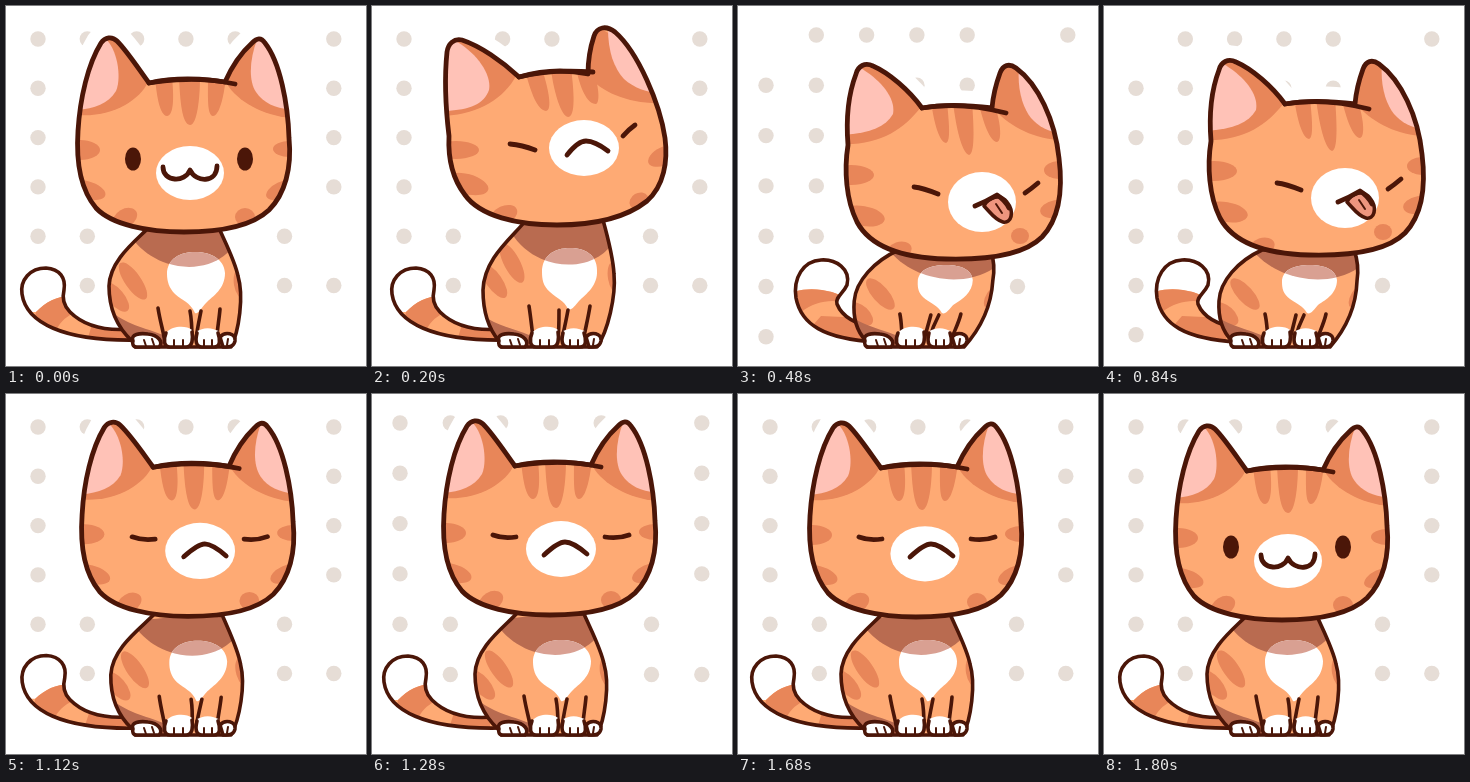
An HTML page for the animation above (1920 ms loop, 360 by 360 pixels).

```html
<!DOCTYPE html>
<html lang="en">
<head>
<meta charset="utf-8">
<title>Sneezing kitten</title>
<style>
html, body { margin: 0; width: 100%; height: 100%; overflow: hidden; background: #fff; }
svg { display: block; width: 100vw; height: 100vh; }
.line { fill: none; stroke: #4b1608; stroke-width: 4.8; stroke-linecap: round; stroke-linejoin: round; }
.thin { stroke-width: 3.6; }
.toe { stroke-width: 2; }
.halo { fill: #fff; stroke: #fff; stroke-width: 30; stroke-linejoin: round; }
.slim { stroke-width: 20; }
.fur { fill: #feaa74; }
.dark { fill: #e88659; }
.pink { fill: #ffc2b7; }
.white { fill: #fff; }
.shade { fill: #b96b50; }
.soft { fill: #d9a092; }
.dot { fill: #e6ddd6; }
.eye { fill: #4b1608; }
</style>
</head>
<body>
<svg id="stage" viewBox="0 0 360 360">
  <defs>
    <path id="head"/><path id="body"/><path id="tail"/><path id="chest"/>
    <clipPath id="inHead"><use href="#head"/></clipPath>
    <clipPath id="inBody"><use href="#body"/></clipPath>
    <clipPath id="inTail"><use href="#tail"/></clipPath>
    <clipPath id="inChest"><use href="#chest"/></clipPath>
  </defs>
  <g id="dots" class="dot"></g>
  <g data-move="tail"><use href="#tail" class="halo slim"/></g>
  <g data-move="body"><use href="#body" class="halo slim"/></g>
  <g data-move="head"><use href="#head" class="halo"/></g>

  <g data-move="tail">
    <use href="#tail" class="fur"/>
    <g clip-path="url(#inTail)">
      <path id="tip" class="white"/><path id="band" class="dark"/><path id="band2" class="dark"/>
    </g>
    <use href="#tail" class="line thin"/>
  </g>

  <g data-move="body">
    <use href="#body" class="fur"/>
    <g clip-path="url(#inBody)">
      <g id="flank" class="dark"></g>
      <path class="shade" d="M104 304C118 318 140 322 157 329L158 341L110 341Z"/>
      <path id="shadow" class="shade"/>
      <use href="#chest" class="white"/>
      <g clip-path="url(#inChest)"><path id="shadow2" class="soft"/></g>
    </g>
    <use href="#body" class="line thin"/>
    <path id="legs" class="line thin"/>
  </g>
  <g id="paws">
    <path class="white" d="M161 326C166 320 180 319 186 324L186 336L183 341L162 341L159 335Z"/>
    <path class="white" d="M191 326C196 321 207 321 213 326L213 336L210 341L193 341L190 335Z"/>
    <path class="line thin" style="fill:#fff" d="M127 335C124 328 134 327 142 328C152 329 158 336 153 341L131 341C127 341 126 338 127 335Z"/>
    <path class="line thin" style="fill:#fff" d="M214 331C219 325 230 327 229 335C228 340 225 341 217 341Z"/>
    <path class="line thin" d="M160 327C157 334 158 341 164 341L180 341C187 341 187 332 186 326M191 327C189 335 190 341 196 341L208 341C215 341 214 333 212 327"/>
    <path class="line toe" d="M138 334L140 340M146 333L148 339M168 334L168 340M177 334L177 340M198 334L198 340M206 334L206 340M222 333L221 339"/>
  </g>

  <g data-move="head">
    <use href="#head" class="fur"/>
    <g clip-path="url(#inHead)">
      <path id="baseL" class="dark"/><path id="earL" class="pink"/>
      <path id="baseR" class="dark"/><path id="earR" class="pink"/>
      <path id="brow" class="dark"/>
      <g id="cheeks" class="dark"></g>
    </g>
    <use href="#head" class="line"/>
    <path id="crown" class="line"/>
    <g id="muzzle" class="white"></g>
    <g id="open" class="eye"><ellipse cx="127" cy="153" rx="8" ry="11.5"/><ellipse cx="239" cy="153" rx="8" ry="11.5"/></g>
    <path id="shut" class="line"/>
    <g id="tongue">
      <path class="line thin" style="fill:#ee957e" d="M243 196C248 186 260 184 266 192C274 202 270 214 262 212C254 210 249 202 243 196Z"/>
      <path class="line toe" d="M255 194L261 203"/>
    </g>
    <path id="smile" class="line" d="M157 161C157 176 179 177 184 164C190 177 211 177 211 160"/>
    <path id="frown" class="line"/>
  </g>
</svg>
<script>
const $ = id => document.getElementById(id);
const NS = 'http://www.w3.org/2000/svg';

const front = {
  head: 'M143 77C132 62 121 45 111 35C106 30 99 31 95 37C82 58 74 92 72 125C70 155 74 183 90 202C106 219 142 226 178 226C212 226 245 221 263 204C279 188 286 162 283 132C282 98 274 56 259 37C255 31 251 32 246 37C236 46 226 60 219 76C195 72 165 73 143 77Z',
  crown: 'M143 77C170 71 200 72 229 78',
  baseL: 'M106 30C120 42 134 58 142 76C134 94 106 112 70 109C60 80 80 45 106 30',
  earL: 'M101 34C113 48 115 74 110 85C102 98 88 103 70 104C60 80 80 40 101 34',
  baseR: 'M252 32C238 42 226 58 221 78C232 96 258 110 286 112C284 80 268 50 252 32',
  earR: 'M251 34C244 52 242 74 250 86C258 98 270 102 286 104C290 78 276 42 251 34',
  brow: 'M149 72L166 72C168 90 168 110 161 110C154 109 151 92 149 72ZM173 70L194 70C194 94 191 119 184 119C176 118 174 95 173 70ZM202 70L220 70C218 92 213 110 207 110C201 109 202 92 202 70Z',
  cheeks: '74 144 20 10 0,80 184 20 9 15,119 212 13 9 -30,284 143 17 8 0,275 184 16 8 -25,239 211 10 9 0',
  muzzle: '184 167 34 27 0',
  shut: 'M121 146Q131 150 144 148M233 148Q246 150 257 146',
  frown: 'M172 166Q186 153 193 153Q201 153 215 165',
  body: 'M146 218C134 232 104 252 103 280C103 304 112 322 126 335L129 341L225 341C233 325 238 290 232 270C229 255 220 238 212 220Z',
  shadow: 'M122 226C145 266 202 272 226 242L226 215Z',
  chest: 'M161 268C161 253 174 246 189 246C205 246 218 253 219 267C219 283 207 290 200 297C195 302 192 309 189 307C184 296 177 295 169 288C163 282 161 275 161 268Z',
  flank: '127 275 22 8 55,110 291 18 8 50,236 278 16 8 80',
  legs: 'M152 302C154 315 157 324 158 331M184 305C186 315 186 325 186 333M195 305C193 315 191 324 190 333M214 303C213 315 211 324 211 331',
  tail: 'M134 322C98 327 76 318 64 306C57 299 56 292 58 284C60 272 54 263 40 262C24 262 14 274 16 288C20 316 56 336 134 334',
  tip: 'M0 240L80 240L66 290C50 290 40 296 30 306L0 306Z',
  band: 'M30 306C40 296 50 290 66 290L66 308C60 311 52 317 48 330L25 330Z',
  band2: 'M88 312L122 318L122 340L80 338Z'
};
const up = { ...front, muzzle: '189 160 35 28 0' };
const tilt = {
  ...front,
  head: 'M147 71C130 55 108 40 90 34C82 32 76 38 75 46C72 75 74 105 77 130C76 150 80 172 93 189C108 210 145 219 185 219C225 219 256 210 275 195C292 180 296 155 293 132C288 98 266 46 243 26C234 19 225 21 222 30C218 42 216 55 216 68C193 63 168 65 147 71Z',
  crown: 'M147 71C170 65 195 64 221 66',
  baseL: 'M84 30C106 36 130 54 144 70C132 92 108 108 72 110C66 84 66 50 84 30',
  earL: 'M82 34C104 46 120 68 117 84C112 98 98 104 72 105C66 84 66 50 82 34',
  baseR: 'M226 22C218 36 215 52 217 70C228 86 258 98 288 97C280 62 252 32 226 22',
  earR: 'M236 22C236 46 242 62 252 73C262 82 274 86 290 88C284 55 264 30 236 22',
  brow: 'M154 68L171 66C176 82 181 104 174 105C165 104 159 86 154 68ZM179 64L199 62C202 85 204 111 196 111C189 110 182 86 179 64ZM204 62L220 62C226 75 229 96 224 98C215 98 208 82 204 62Z',
  cheeks: '84 144 23 9 0,95 178 22 10 15,132 209 14 9 -25,298 118 8 6 0,292 150 17 9 -25,267 195 10 8 -30',
  muzzle: '212 142 35 28 0',
  shut: 'M138 138Q150 139 163 144M251 130Q256 124 263 119',
  frown: 'M195 149Q206 135 214 135Q223 135 236 145',
  body: 'M156 212C140 232 112 252 111 284C111 306 116 322 127 335L129 341L225 341C236 325 244 290 242 268C241 250 236 232 231 214Z',
  shadow: 'M134 216C154 266 218 270 240 238L238 208Z',
  chest: 'M170 266C170 250 182 242 198 242C213 242 225 249 225 264C226 280 214 288 207 295C203 300 199 305 196 303C192 294 185 293 178 286C171 280 170 273 170 266Z',
  flank: '140 257 22 8 62,122 275 20 8 55,243 272 16 7 80',
  legs: 'M157 300C159 313 160 324 161 331M187 304C187 315 187 325 186 333M196 304C194 315 192 324 190 333M218 300C216 313 213 324 212 331'
};
const lean = {
  head: 'M181 98C168 80 148 63 132 56C124 52 117 56 115 64C107 85 105 110 107 135C103 160 105 190 116 212C130 238 165 248 205 249C245 250 283 245 301 227C319 208 322 180 318 148C314 110 297 74 275 58C268 53 262 55 259 63C255 74 252 86 251 98C228 95 203 94 181 98Z',
  crown: 'M181 98C205 94 235 95 265 103',
  baseL: 'M124 52C146 62 168 80 180 97C162 120 138 136 98 134C92 100 104 72 124 52',
  earL: 'M118 57C140 70 155 88 152 104C144 118 126 124 98 125C94 100 100 76 118 57',
  baseR: 'M266 54C256 66 252 84 254 100C270 118 296 130 322 130C318 92 296 64 266 54',
  earR: 'M278 57C276 80 282 98 290 108C298 117 308 122 322 124C318 92 300 66 278 57',
  brow: 'M190 92L206 92C208 112 210 132 205 133C198 132 193 112 190 92ZM212 92L231 92C233 118 234 144 228 145C221 143 215 118 212 92ZM238 94L253 94C259 108 262 131 256 132C249 132 242 112 238 94Z',
  cheeks: '110 165 23 10 0,122 206 22 10 10,158 241 13 9 -20,318 160 15 9 0,315 199 16 9 -10,279 226 9 8 0',
  muzzle: '241 192 34 30 0',
  shut: 'M173 177Q182 178 197 184M284 183Q290 179 297 173',
  frown: 'M234 196Q246 191 256 185Q264 190 268 198',
  body: 'M158 244C134 255 116 275 115 295C114 312 118 325 128 335L129 341L226 341C240 325 252 305 253 275C255 262 253 252 250 244Z',
  shadow: 'M150 246C175 275 225 282 254 262L254 240Z',
  chest: 'M178 276C178 264 190 259 206 259C221 259 232 264 233 274C233 287 223 293 214 299C210 304 206 309 203 307C199 300 193 298 186 293C179 288 178 282 178 276Z',
  flank: '141 288 20 8 48,122 308 15 8 42,253 290 13 6 -60',
  legs: 'M161 308C163 316 163 325 164 331M192 309C190 317 188 325 186 333M200 309C196 317 193 325 191 333M222 308C220 317 216 325 214 331',
  tail: 'M134 322C108 318 98 308 94 298C92 291 100 288 104 279C108 263 93 253 78 254C60 255 50 272 53 292C58 318 80 333 134 336',
  tip: 'M40 245L112 245L106 294C92 284 68 280 50 286L40 286Z',
  band: 'M50 286C68 280 92 284 106 294L104 298C92 292 72 295 58 306L50 304Z',
  band2: 'M78 310L122 312L122 338L64 326Z'
};

// start, from, to, mix, head x, head y, tail x, face, wide dots, dot map
const steps = [
  [0, front, front, 0, 0, 0, 0, 'calm', 0, 'sit'],
  [80, up, tilt, .3, 0, -1, 1, 'hold', 0, 'sit'],
  [120, up, tilt, .75, 0, -1, 3, 'hold', 0, 'sit'],
  [200, tilt, tilt, 0, 0, 0, 4, 'hold', 0, 'sit'],
  [320, tilt, tilt, 0, 1, -2, 4, 'hold', 0, 'sit'],
  [360, tilt, lean, .3, 0, 0, 3, 'hold', 0, 'sit'],
  [400, tilt, lean, .8, 0, 2, 2, 'sneeze', 0, 'lean'],
  [440, lean, lean, 0, 4, 7, 4, 'sneeze', 1, 'lean'],
  [480, lean, lean, 0, 3, 4, 5, 'sneeze', 1, 'lean'],
  [520, lean, lean, 0, 1, 2, 3, 'sneeze', 1, 'lean'],
  [600, lean, lean, 0, 0, 0, 1, 'sneeze', 1, 'lean'],
  [840, lean, lean, 0, 0, 0, 0, 'sneeze', 0, 'lean'],
  [1040, lean, up, .6, 0, -2, 0, 'hold', 0, 'sit'],
  [1120, up, lean, .06, 2, -5, -2, 'hold', 0, 'sit'],
  [1200, up, up, 0, 1, -6, -2, 'hold', 0, 'sit'],
  [1280, up, up, 0, 0, -5, -4, 'hold', 1, 'sit'],
  [1680, up, front, .4, 0, -3, -2, 'hold', 0, 'sit'],
  [1720, up, front, .8, 0, 1, -1, 'wake', 0, 'sit'],
  [1760, front, front, 0, 0, 2, 0, 'calm', 0, 'sit'],
  [1800, front, front, 0, 0, 0, 0, 'calm', 0, 'sit']
];
const maps = {
  sit: ['xxxxx.x', 'x.....x', 'x.....x', 'x.....x', 'xx...x.', '.x...xx', '.......'],
  lean: ['.xxxx.x', 'xx.xx..', 'xx.....', 'xx.....', 'xx.....', 'x....x.', 'x......']
};
const loop = 1920;

function blend(a, b, t) {
  if (!t || a === b) return a;
  const goal = b.match(/-?[\d.]+/g);
  let i = 0;
  return a.replace(/-?[\d.]+/g, n => +(+n + (goal[i++] - n) * t).toFixed(2));
}

function ovals(group, text) {
  text.split(',').forEach((item, i) => {
    const [x, y, rx, ry, turn] = item.split(' ');
    const el = group.children[i] || group.appendChild(document.createElementNS(NS, 'ellipse'));
    el.setAttribute('rx', rx);
    el.setAttribute('ry', ry);
    el.setAttribute('transform', `translate(${x} ${y}) rotate(${turn})`);
  });
}

function drawDots(wide, map) {
  const [x, y, gap] = wide ? [28, 29, 50.3] : [32, 33, 49.3];
  let html = '';
  maps[map].forEach((row, j) => [...row].forEach((c, i) => {
    if (c === 'x') html += `<circle cx="${x + gap * i}" cy="${y + gap * j}" r="7.7"/>`;
  }));
  $('dots').innerHTML = html;
}

const show = (id, on) => $(id).setAttribute('display', on ? 'inline' : 'none');

function draw([, from, to, mix, dx, dy, tx, face, wide, map]) {
  for (const name in from) {
    const value = blend(from[name], to[name], mix);
    if (/cheeks|flank|muzzle/.test(name)) ovals($(name), value);
    else $(name).setAttribute('d', value);
    if (name === 'shadow') $('shadow2').setAttribute('d', value);
  }
  const moves = {
    head: `translate(${dx} ${dy})`,
    body: `matrix(1 0 ${-dx / 110} 1 ${dx * 340 / 110} 0)`,
    tail: `translate(${tx} 0)`
  };
  document.querySelectorAll('[data-move]').forEach(g => g.setAttribute('transform', moves[g.dataset.move]));
  const calm = face === 'calm';
  show('open', calm);
  show('shut', !calm);
  show('smile', calm || face === 'wake');
  show('frown', face === 'hold' || face === 'sneeze');
  show('tongue', face === 'sneeze');
  drawDots(wide, map);
}

let last;
function tick() {
  const t = performance.now() % loop;
  const step = steps.findLast(s => s[0] <= t);
  if (step !== last) draw(last = step);
  requestAnimationFrame(tick);
}
tick();
</script>
</body>
</html>
```
